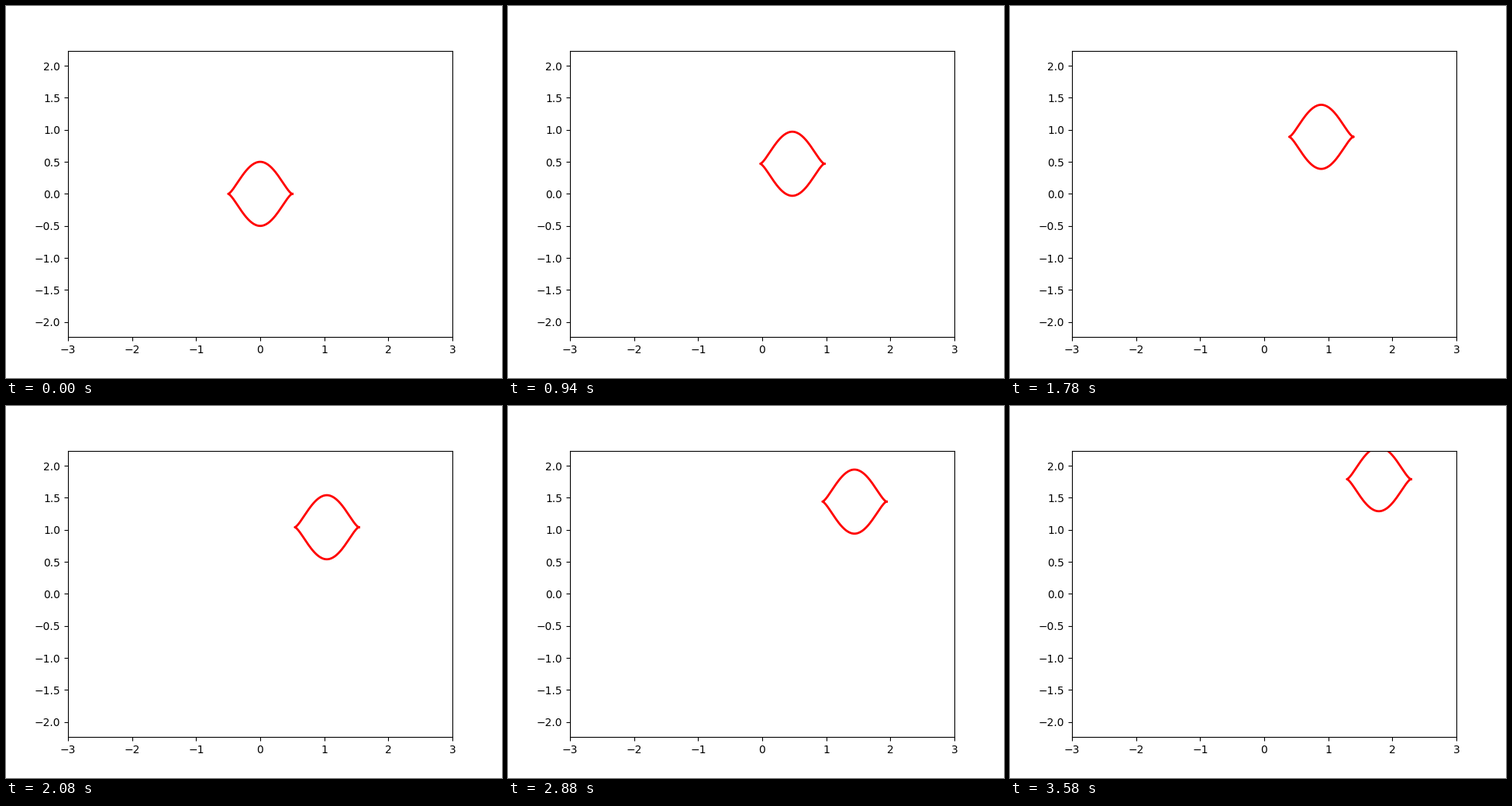
A matplotlib script for the animation above (3600 ms loop, 640 by 480 pixels).

```python
import numpy as np
import matplotlib.pyplot as plt
from matplotlib.animation import FuncAnimation

FRAMES = 180
INTERVAL = 20  # ms
STEP = 0.01    # diagonal shift per frame, in data units

fig, ax = plt.subplots(figsize=(6.4, 4.8), dpi=100)
half_height = 3 * (4.8 * 0.77) / (6.4 * 0.775)  # equal scale on both axes
ax.set_xlim(-3, 3)
ax.set_ylim(-half_height, half_height)

t = np.linspace(0, 2 * np.pi, 200)
x = 0.5 * np.cos(t)
y = 0.5 * np.sin(t) ** 3
line, = ax.plot(x, y, color="red", lw=2)


def update(i):
    shift = STEP * i
    line.set_data(x + shift, y + shift)
    return line,


anim = FuncAnimation(fig, update, frames=FRAMES, interval=INTERVAL,
                     repeat=True, repeat_delay=0)
plt.show()
```
